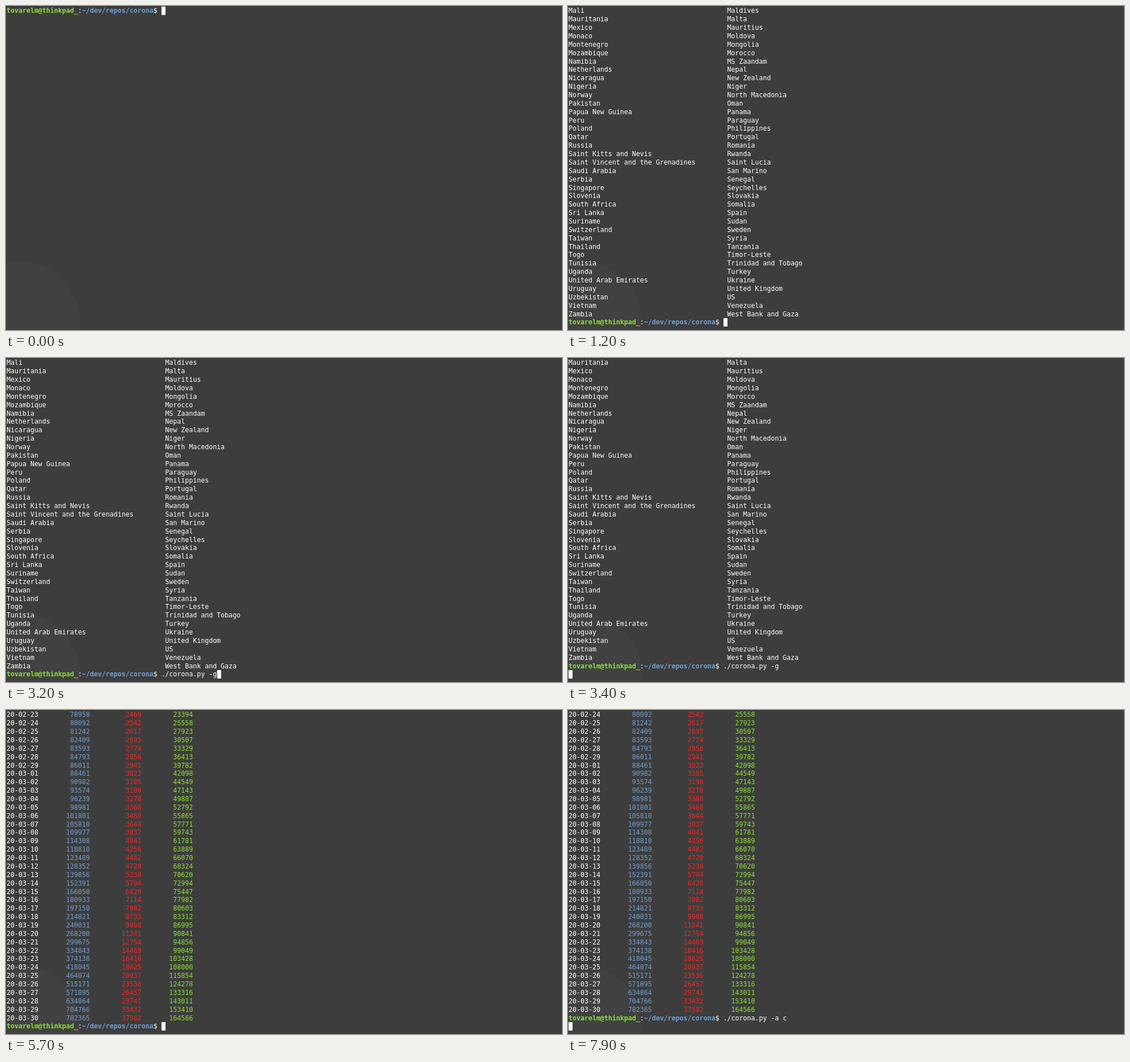
Write an HTML page that moves like this. It is 979 px wide and 572 px high and loops after 8 s.

```html
<!DOCTYPE html>
<html lang="en">
<head>
<meta charset="utf-8">
<title>Terminal session</title>
<style>
  html, body { margin: 0; width: 100%; height: 100%; overflow: hidden; }
  body { position: relative; background: radial-gradient(circle at 20px 560px, #414141 110px, #3d3d3d 110.5px); }
  /* A grid of 8 x 17 cells, scaled down to the stage. */
  #terminal { position: absolute; left: .9px; top: 1px; transform: scale(.8744); transform-origin: 0 0; }
  #screen { margin: 0; font: 13.288px/17px "DejaVu Sans Mono", monospace; color: #fff; white-space: pre; }
  #cursor { position: absolute; width: 8px; height: 17px; background: #fff; }
  .green { color: #8ae234; }
  .blue { color: #729fcf; }
  .red { color: #ef2929; }
</style>
</head>
<body>
<div id="terminal"><pre id="screen"></pre><div id="cursor"></div></div>
<script>
const LOOP = 8000, ROWS = 38, PROMPT_COLS = 39;
const COMMAND = './corona.py ';
const PROMPT = '<b class="green">tovarelm@thinkpad_</b>:<b class="blue">~/dev/repos/corona</b>$ ';

const countries = `Mali|Maldives
Mauritania|Malta
Mexico|Mauritius
Monaco|Moldova
Montenegro|Mongolia
Mozambique|Morocco
Namibia|MS Zaandam
Netherlands|Nepal
Nicaragua|New Zealand
Nigeria|Niger
Norway|North Macedonia
Pakistan|Oman
Papua New Guinea|Panama
Peru|Paraguay
Poland|Philippines
Qatar|Portugal
Russia|Romania
Saint Kitts and Nevis|Rwanda
Saint Vincent and the Grenadines|Saint Lucia
Saudi Arabia|San Marino
Serbia|Senegal
Singapore|Seychelles
Slovenia|Slovakia
South Africa|Somalia
Sri Lanka|Spain
Suriname|Sudan
Switzerland|Sweden
Taiwan|Syria
Thailand|Tanzania
Togo|Timor-Leste
Tunisia|Trinidad and Tobago
Uganda|Turkey
United Arab Emirates|Ukraine
Uruguay|United Kingdom
Uzbekistan|US
Vietnam|Venezuela
Zambia|West Bank and Gaza`.split('\n').map(row => {
  const [left, right] = row.split('|');
  return left.padEnd(40) + right;
});

// Totals every sixth day; the days between grow by a constant factor.
const KEY_DAYS = 6;
const totals = {
  blue: [78958, 86011, 101801, 128352, 214821, 418045, 782365],
  red: [2469, 2941, 3460, 4720, 8733, 18625, 37582],
  green: [23394, 39782, 55865, 68324, 83312, 108000, 164566],
};

function totalOn(day, keys) {
  const i = Math.floor(day / KEY_DAYS);
  const growth = (keys[i + 1] ?? keys[i]) / keys[i];
  return Math.round(keys[i] * growth ** (day / KEY_DAYS - i));
}

const cases = Array.from({ length: ROWS - 1 }, (_, day) => {
  const date = new Date(Date.UTC(2020, 1, 23 + day)).toISOString().slice(2, 10);
  const cells = Object.entries(totals).map(([color, keys]) =>
    `<span class="${color}">${String(totalOn(day, keys)).padStart(13)}</span>`);
  return date + cells.join('');
});

// [start ms, output above the prompt, typed text, cursor visible, command entered]
const steps = [
  [0, [], '', true],
  [300, [], './', true],
  [400, [], COMMAND, true],
  [500, [], COMMAND + '-', true],
  [600, [], COMMAND + '-l', true],
  [900, [], COMMAND + '-l', true, true],
  [1200, countries, '', true],
  [1500, countries, '', false],
  [1800, countries, COMMAND + '-l', true],
  [2400, countries, COMMAND + '-', true],
  [3000, countries, COMMAND + '-', false],
  [3200, countries, COMMAND + '-g', true],
  [3400, countries, COMMAND + '-g', true, true],
  [3800, countries, COMMAND + '-g', false, true],
  [4400, countries, COMMAND + '-g', true, true],
  [5200, countries, COMMAND + '-g', false, true],
  [5700, cases, '', true],
  [6000, cases, COMMAND + '-g', true],
  [6700, cases, COMMAND + '-', true],
  [7100, cases, COMMAND + '-a', true],
  [7200, cases, COMMAND + '-a ', true],
  [7400, cases, COMMAND + '-a c', true],
  [7900, cases, COMMAND + '-a c', true, true],
];

const screenEl = document.getElementById('screen');
const cursorEl = document.getElementById('cursor');
let shown;

function show([, output, typed, cursorOn, entered]) {
  const lines = [...output, PROMPT + typed, ...(entered ? [''] : [])].slice(-ROWS);
  screenEl.innerHTML = lines.join('\n');
  cursorEl.style.left = (entered ? 0 : PROMPT_COLS + typed.length) * 8 + 'px';
  cursorEl.style.top = (lines.length - 1) * 17 + 'px';
  cursorEl.hidden = !cursorOn;
}

function tick() {
  const time = performance.now() % LOOP;
  const step = steps.findLast(([start]) => start <= time);
  if (step !== shown) show(shown = step);
  requestAnimationFrame(tick);
}
tick();
</script>
</body>
</html>
```
